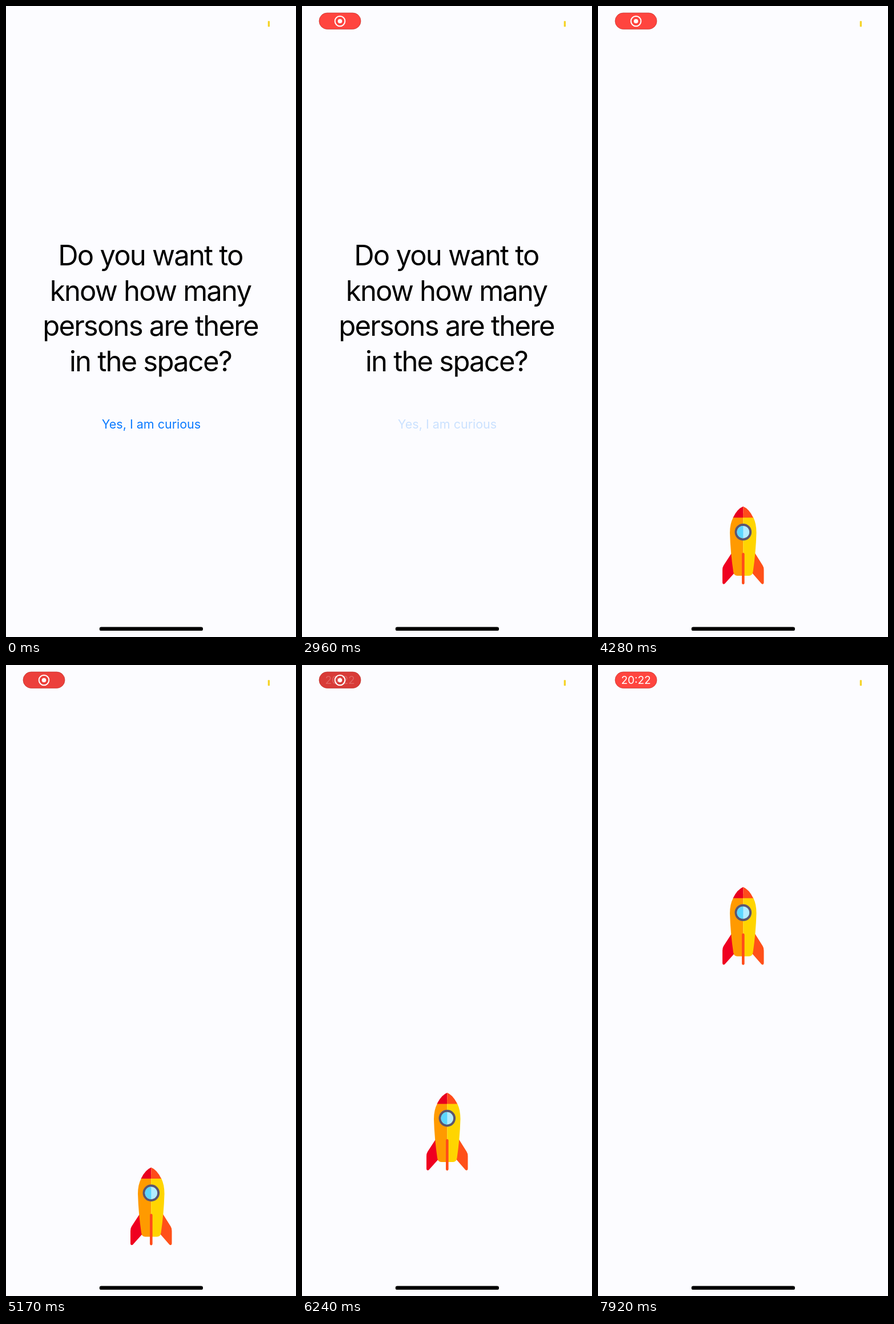
An HTML page that plays this animation: 508 px wide and 1102 px high, repeating every 8000 ms.

```html
<!DOCTYPE html>
<html lang="en">
<head>
<meta charset="utf-8">
<title>Rocket</title>
<style>
html, body { margin: 0; width: 100%; height: 100%; overflow: hidden; background: #fcfcff; }
svg { display: block; width: 100%; height: 100%; font-family: Inter, Roboto, sans-serif; }
text { text-anchor: middle; }
</style>
</head>
<body>
<svg viewBox="0 0 508 1102">
  <g id="pill">
    <rect id="pillBody" x="30" y="12" width="73" height="28.5" rx="14.2" stroke="#b8241f" stroke-opacity=".6"/>
    <text id="clock" x="66.5" y="33" font-size="19" fill="#fff">20:22</text>
    <g id="icon">
      <circle cx="66.5" cy="26.5" r="8.8" fill="none" stroke="#fff" stroke-width="2"/>
      <circle cx="66.5" cy="26.5" r="3.8" fill="#fff"/>
    </g>
  </g>
  <rect x="458.7" y="26.3" width="3.3" height="10" rx=".8" fill="#f5d327"/>

  <g id="question">
    <g font-size="49" letter-spacing="-1.8">
      <text x="253" y="453">Do you want to</text>
      <text x="253" y="514.5">know how many</text>
      <text x="253" y="576">persons are there</text>
      <text x="253" y="637.5">in the space?</text>
    </g>
    <text id="button" x="254.5" y="737.5" font-size="21.5" fill="#0a7aff">Yes, I am curious</text>
  </g>

  <g id="rocket">
    <path d="M235 80L220 103Q218 106 218 111V133Q218.500 137 222 135L240 115Z" fill="#ef0020"/>
    <path d="M274 80L288.500 103Q290.500 106 290.500 111V133Q290 137 286.500 135L269 115Z" fill="#ff5019"/>
    <path d="M254.300 12L237 19Q231 30 231 46Q232 80 237 114Q238 121 244 121H254.300Z" fill="#ff9a00"/>
    <path d="M254.300 12L272 19Q277.500 30 277.500 46Q276.500 80 271.500 114Q270.500 121 264.500 121H254.300Z" fill="#ffd500"/>
    <path d="M254.300 0Q244 4 236.500 19.500H254.300Z" fill="#e8001f"/>
    <path d="M254.300 0Q264.500 4 272 19.500H254.300Z" fill="#ff4b1a"/>
    <circle cx="254.300" cy="44.700" r="14.800" fill="#5b5570"/>
    <circle cx="254.300" cy="44.700" r="10.800" fill="#b3ecff"/>
    <path d="M254.300 33.900A10.800 10.800 0 0 0 254.300 55.500Z" fill="#5cd6ff"/>
    <rect x="252" y="81" width="4.600" height="55" rx="2.300" fill="#ff4b1a"/>
  </g>

  <rect x="163.700" y="1084.600" width="181.300" height="6.500" rx="3.200"/>
</svg>
<script>
const LOOP = 8000;
const $ = id => document.getElementById(id);
const ramp = (t, a, b) => Math.min(1, Math.max(0, (t - a) / (b - a)));
const mix = (a, b, k) => a + (b - a) * k;
const fade = (id, k) => $(id).setAttribute('opacity', k);

// [time, top of rocket]: hover, then climb
const climb = [
  [3050, 902], [3500, 889], [4280, 874], [4720, 889], [5170, 877.5], [5960, 754],
  [6240, 747], [6800, 666], [7040, 631], [7640, 446], [7920, 388], [8000, 366]
];

const slope = i => {
  const a = climb[Math.max(0, i - 1)], b = climb[Math.min(climb.length - 1, i + 1)];
  return (b[1] - a[1]) / (b[0] - a[0]);
};

// Cubic Hermite curve through the climb points
function rocketTop(t) {
  if (t <= climb[0][0]) return climb[0][1];
  const i = climb.findIndex(p => p[0] >= t) - 1;
  const [t0, y0] = climb[i], [t1, y1] = climb[i + 1];
  const d = t1 - t0, u = (t - t0) / d, v = 1 - u;
  return v * v * (1 + 2 * u) * y0 + u * u * (3 - 2 * u) * y1
    + d * u * v * (v * slope(i) - u * slope(i + 1));
}

function draw(t) {
  fade('pill', ramp(t, 20, 420));
  const dim = t < 4280 ? 0 : (1 - Math.cos((t - 4280) / 3640 * 2 * Math.PI)) / 2;
  $('pillBody').setAttribute('fill',
    `rgb(${mix(255, 215, dim)},${mix(69, 59, dim)},${mix(63, 55, dim)})`);
  fade('clock', ramp(t, 6160, 6560));
  fade('icon', 1 - ramp(t, 6300, 6700));

  fade('button', mix(1, 0.2, ramp(t, 2860, 2940)));
  const swap = ramp(t, 3050, 3380);
  fade('question', 1 - swap);
  fade('rocket', swap);
  $('rocket').setAttribute('transform', `translate(0 ${rocketTop(t)})`);
}

const start = performance.now();
function tick() {
  draw((performance.now() - start) % LOOP);
  requestAnimationFrame(tick);
}
tick();
</script>
</body>
</html>
```
